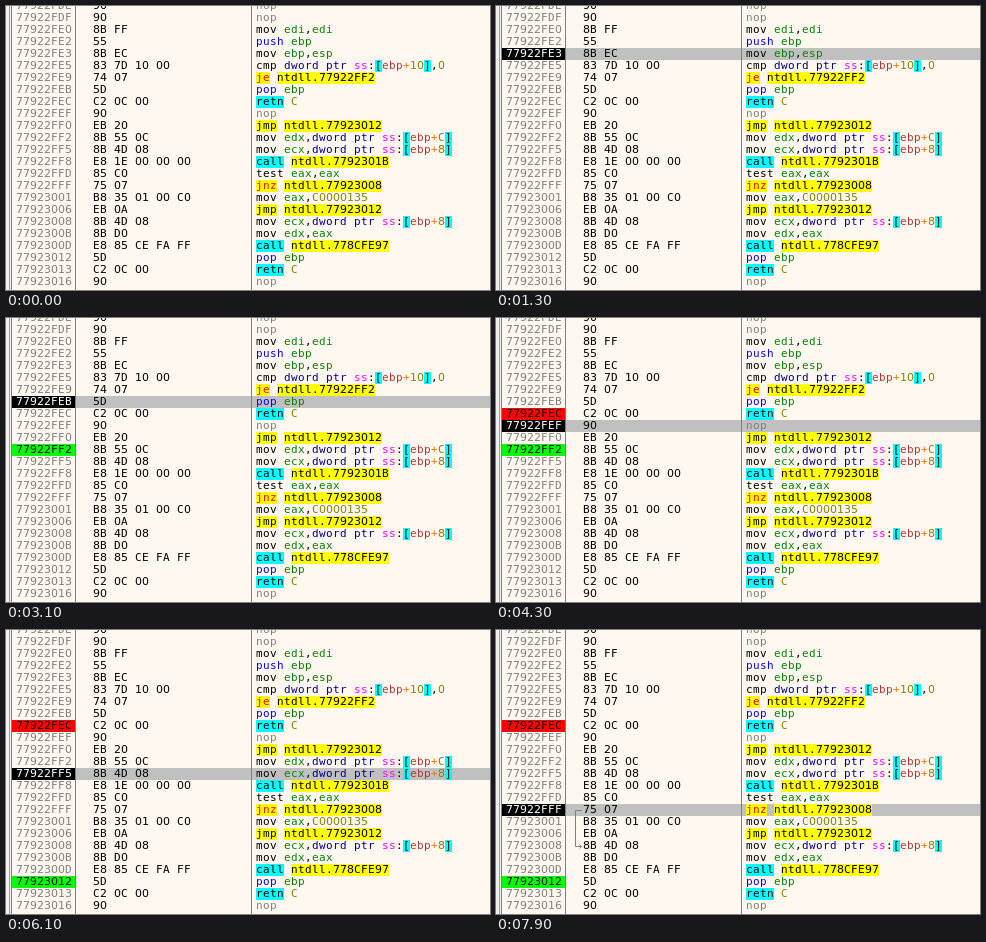
Recreate the animation shown at these times as an HTML page with a canvas. Size 484 by 284 pixels, loop 8 s.

```html
<!DOCTYPE html>
<html lang="en">
<head>
<meta charset="utf-8">
<title>Disassembly trace</title>
<style>
html, body { margin: 0; width: 100%; height: 100%; overflow: hidden; background: #fff8f0; }
canvas { display: block; width: 484px; height: 284px; }
</style>
</head>
<body>
<canvas id="view" width="484" height="284"></canvas>
<script>
const ctx = document.getElementById('view').getContext('2d', { alpha: false });
const W = 484, H = 284, ROW = 12, CELL = 7, TOP = -6, BASE = 9;
const LEFT = 6, BYTES = 70, CODE = 246;
const LOOP = 8000, FIRST = 100, STEP = 600;

const MONO = '11px "DejaVu Sans Mono", monospace';
const DIGIT = '11px "DejaVu Sans", sans-serif';

const rows = `77922FDE|90|nop
77922FDF|90|nop
77922FE0|8B FF|mov edi,edi
77922FE2|55|push ebp
77922FE3|8B EC|mov ebp,esp
77922FE5|83 7D 10 00|cmp dword ptr ss:[ebp+10],0
77922FE9|74 07|je ntdll.77922FF2
77922FEB|5D|pop ebp
77922FEC|C2 0C 00|retn C
77922FEF|90|nop
77922FF0|EB 20|jmp ntdll.77923012
77922FF2|8B 55 0C|mov edx,dword ptr ss:[ebp+C]
77922FF5|8B 4D 08|mov ecx,dword ptr ss:[ebp+8]
77922FF8|E8 1E 00 00 00|call ntdll.7792301B
77922FFD|85 C0|test eax,eax
77922FFF|75 07|jnz ntdll.77923008
77923001|B8 35 01 00 C0|mov eax,C0000135
77923006|EB 0A|jmp ntdll.77923012
77923008|8B 4D 08|mov ecx,dword ptr ss:[ebp+8]
7792300B|8B D0|mov edx,eax
7792300D|E8 85 CE FA FF|call ntdll.778CFE97
77923012|5D|pop ebp
77923013|C2 0C 00|retn C
77923016|90|nop`.split('\n').map(line => line.split('|'));

const rowOf = tail => rows.findIndex(r => r[0].endsWith(tail));
const RET = rowOf('FEC'), NEAR = rowOf('FF2'), FAR = rowOf('3012');
const jumps = new Map([['FE9', 'FF2'], ['FF0', '3012'], ['FFF', '3008']]
  .map(pair => pair.map(rowOf)));

// [pattern, ink, background]; the first match wins
const styles = [
  [/^ntdll/, '#000', '#ff0'],
  [/^jmp$/, '#000', '#ff0'],
  [/^j(e|nz)$/, '#f00', '#ff0'],
  [/^(call|retn)$/, '#000', '#0ff'],
  [/^[[\]]$/, '#000', '#0ff'],
  [/^(push|pop)$/, '#00f'],
  [/^nop$/, '#808080'],
  [/^dword/, '#000080'],
  [/^ss$/, '#f0f'],
  [/^e(ax|bp|cx|dx|di|sp)$/, '#008300'],
  [/^\+$/, '#f27711'],
  [/^[0-9A-F]+$/, '#828200'],
  [/./, '#000']
];

function rect(x, y, w, h, color) {
  ctx.fillStyle = color;
  ctx.fillRect(x, y, w, h);
}

function text(str, x, y, color) {
  ctx.fillStyle = color;
  [...str].forEach((c, i) => {
    ctx.font = /\d/.test(c) ? DIGIT : MONO;
    ctx.fillText(c, x + i * CELL, y + BASE);
  });
}

function code(str, x, y) {
  let inside = false;
  for (const token of str.match(/ntdll\.\w+|dword ptr|\w+|./g)) {
    let [, ink, back] = styles.find(s => s[0].test(token));
    if (inside && token === 'ebp') ink = '#b03434';
    if (token === '[') inside = true;
    if (token === ']') inside = false;
    const w = token.length * CELL;
    if (back) rect(x, y, w, ROW, back);
    text(token, x, y, ink);
    x += w;
  }
}

function arrow(from, to) {
  const mid = i => TOP + i * ROW + 6.5;
  const a = mid(from), b = mid(to);
  ctx.strokeStyle = '#808080';
  ctx.lineWidth = 1;
  ctx.beginPath();
  ctx.moveTo(86, a);
  ctx.lineTo(79.5, a);
  ctx.lineTo(79.5, b);
  ctx.lineTo(86, b);
  ctx.moveTo(83.5, b - 2);
  ctx.lineTo(85.5, b);
  ctx.lineTo(83.5, b + 2);
  ctx.stroke();
}

function mark(i, current) {
  if (i === current) return ['#000', '#fff'];
  if (i === RET && current > RET) return ['#f00', '#000'];
  const target = current >= NEAR ? FAR : current > rowOf('FE9') ? NEAR : -1;
  return i === target ? ['#0f0', '#000'] : [null, '#808080'];
}

function draw(t) {
  const current = t < FIRST ? -1 : 2 + Math.floor((t - FIRST) / STEP);
  rect(0, 0, W, H, '#fff8f0');
  rows.forEach(([addr, bytes, op], i) => {
    const y = TOP + i * ROW;
    const [back, ink] = mark(i, current);
    if (i === current) rect(LEFT, y, W - LEFT, ROW, '#c0c0c0');
    if (back) rect(LEFT, y, BYTES - LEFT, ROW, back);
    text(addr, LEFT + 4, y, ink);
    text(bytes, BYTES + 17, y, '#000');
    code(op, CODE + 4, y);
  });
  rect(0, 0, LEFT, H, '#f0f0f0');
  rect(3, 0, 1, H, '#a0a0a0');
  for (const x of [LEFT, BYTES, CODE]) rect(x - 1, 0, 1, H, '#808080');
  if (jumps.has(current)) arrow(current, jumps.get(current));
}

const start = performance.now();
function tick() {
  draw((performance.now() - start) % LOOP);
  requestAnimationFrame(tick);
}
tick();
</script>
</body>
</html>
```
